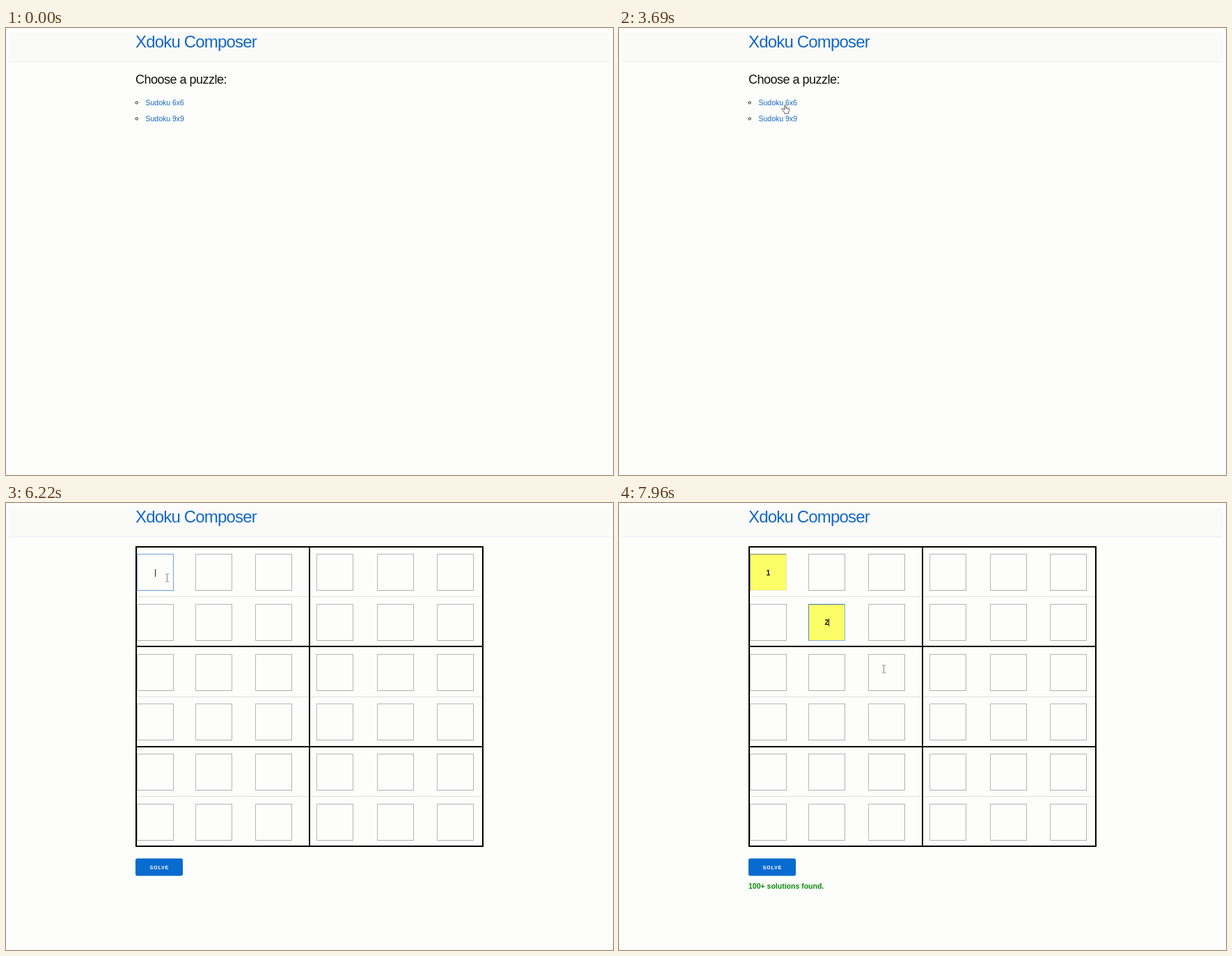
Recreate the animation shown at these times as an HTML page. Size 872x642 px, loop 8000 ms.

```html
<!DOCTYPE html>
<html lang="en">
<head>
<meta charset="utf-8">
<title>Xdoku Composer</title>
<style>
html, body { margin: 0; width: 100%; height: 100%; overflow: hidden; background: #fdfdfc; }
svg { display: block; width: 872px; height: 642px; font: 10.5px "Liberation Sans", Arial, sans-serif; }
.crisp { shape-rendering: crispEdges; }
.link { fill: #1267c5; }
.bold { font-weight: bold; }
.mid { text-anchor: middle; }
</style>
</head>
<body>
<svg viewBox="0 0 872 642">
  <rect width="872" height="642" fill="#fdfdfc"/>
  <g class="crisp">
    <rect x="4" y="7" width="863" height="41" fill="#fafaf9"/>
    <rect x="4" y="48" width="863" height="1" fill="#ebebf5"/>
  </g>
  <text class="link" x="186" y="28" font-size="24" letter-spacing="-.83">Xdoku Composer</text>

  <g id="menu">
    <text x="186" y="80" font-size="18" letter-spacing="-.5" fill="#111">Choose a puzzle:</text>
    <g fill="none" stroke="#222">
      <circle cx="187.7" cy="107.3" r="1.7"/>
      <circle cx="187.7" cy="130.3" r="1.7"/>
    </g>
    <text class="link" x="200.5" y="111">Sudoku 6x6</text>
    <text class="link" x="200.5" y="134">Sudoku 9x9</text>
  </g>

  <g id="board">
    <g id="grid" class="crisp"></g>
    <rect x="186" y="510.5" width="68" height="25" rx="2.7" fill="#086bcf"/>
    <text class="bold" x="206.5" y="526" font-size="7.3" letter-spacing=".67" fill="#fff">SOLVE</text>
    <text id="note" class="bold" x="186" y="554" fill="#0a8a0a">100+ solutions found.</text>
    <text id="one" class="bold mid" x="214.5" y="103.5" fill="#111">1</text>
    <text id="two" class="bold mid" x="298.5" y="175" fill="#111">2</text>
    <rect id="caret" class="crisp" width="1" height="11" fill="#222"/>
    <rect id="speck" class="crisp" x="294" y="175" width="2" height="2" fill="#777"/>
  </g>

  <g id="arrow">
    <path d="M0 0V10.2L2.4 8L4 11.6L5.7 10.9L4.1 7.4H7.2Z" fill="#000" stroke="#fff" stroke-width=".5"/>
  </g>
  <g id="hand">
    <path d="M-.9 7.2V1Q-.9 0 .1 0T1.1 1V4.2Q2 3.5 2.8 4.4Q3.8 3.8 4.5 4.8Q5.9 4.5 6 6V8.2L4.9 10.6V12.4H-.8V11L-3.3 8L-4.8 5.9Q-4.6 4.6 -3.2 5.2L-.9 7.2Z" fill="#fff" stroke="#444" stroke-width=".9" stroke-linejoin="round"/>
    <path d="M1.1 4.2V6M2.8 4.4V6.2M4.5 4.8V6.3" fill="none" stroke="#555" stroke-width=".7"/>
  </g>
  <g id="beam">
    <path d="M-2.5 -5.5H-.6L0 -5L.6 -5.5H2.5M0 -5V5M-2.5 5.5H-.6L0 5L.6 5.5H2.5" fill="none" stroke="#8b8676"/>
  </g>
</svg>
<script>
const LOOP = 8000;
const NS = "http://www.w3.org/2000/svg";
const $ = id => document.getElementById(id);
const grid = $("grid");

function rect(x, y, w, h, fill) {
  const r = document.createElementNS(NS, "rect");
  const attrs = { x, y, width: w, height: h, fill };
  for (const k in attrs) r.setAttribute(k, attrs[k]);
  grid.append(r);
  return r;
}

// An input box: a fill plus four edges that can be coloured one by one.
function cell(x, y) {
  const s = 53;
  return {
    face: rect(x, y, s, s, "none"),
    edges: [
      rect(x, y, s, 1), rect(x + s - 1, y, 1, s),
      rect(x, y + s - 1, s, 1), rect(x, y, 1, s)
    ]
  };
}

const LOOKS = {
  plain: ["none", "#b5b5b9", "#b2b2b6", "#b0b0b4", "#b8b8bc"],
  focus: ["none", "#6f9fd8", "#6f9fd8", "#6f9fd8", "#6f9fd8"],
  full: ["#fdfd68", "#83836c", "#e6e6b0", "#ebebb8", "#93937c"],
  both: ["#fdfd68", "#4078b4", "#8db2d8", "#8db2d8", "#5586bc"]
};

function paint(c, look) {
  const [face, ...edges] = LOOKS[look];
  c.face.setAttribute("fill", face);
  c.edges.forEach((e, i) => e.setAttribute("fill", edges[i]));
}

for (const y of [134, 278, 421]) rect(188, y, 496, 1, "#dedee0");
const cols = [188, 272, 358, 446, 533, 619];
const rows = [73, 145, 217, 288, 360, 432];
const cells = rows.map(y => cols.map(x => cell(x, y)));
cells.flat().forEach(c => paint(c, "plain"));
for (const y of [62, 205, 349, 492]) rect(186, y, 500, 2, "#000");
for (const x of [186, 435, 684]) rect(x, 62, 2, 432, "#000");

const T = {
  show: 2790, link: 3690, page: 3990, beam: 4420,
  focus1: 6060, type1: 6520, note: 6640,
  focus2: 7300, type2: 7560
};

// time, x, y of the pointer
const path = [
  [2790, 714, 265], [3150, 530, 190], [3510, 340, 126],
  [3600, 276, 116], [3690, 238.5, 110.5], [4420, 237.5, 110.5],
  [5260, 237.5, 110.5], [5800, 231.5, 107.5],
  [6700, 231.5, 107.5], [7000, 262, 138], [7290, 304, 176.5],
  [7580, 304, 176.5], [7670, 342, 205], [7960, 380.5, 238.5]
];

function pointer(t) {
  if (t < T.page) t = T.show + Math.floor((t - T.show) / 90) * 90;
  let i = path.findIndex(p => p[0] > t);
  if (i < 0) return path[path.length - 1].slice(1);
  if (i === 0) return path[0].slice(1);
  const [a, ax, ay] = path[i - 1], [b, bx, by] = path[i];
  const k = (t - a) / (b - a);
  return [ax + (bx - ax) * k, ay + (by - ay) * k];
}

const show = (id, on) => $(id).style.display = on ? "" : "none";

function draw(t) {
  const onPage = t >= T.page;
  show("menu", !onPage);
  show("board", onPage);
  show("one", t >= T.type1);
  show("two", t >= T.type2);
  show("note", t >= T.note);
  show("speck", t >= T.focus2 && t < T.type2);

  const second = t >= T.focus2;
  paint(cells[0][0], t < T.focus1 ? "plain" : t < T.type1 ? "focus" : second ? "full" : "both");
  paint(cells[1][1], !second ? "plain" : t < T.type2 ? "focus" : "both");

  const typed = t >= (second ? T.type2 : T.type1);
  const since = t - (second ? (typed ? T.type2 : T.focus2) : (typed ? T.type1 : T.focus1));
  show("caret", t >= T.focus1 && since % 1000 < 500);
  $("caret").setAttribute("x", (second ? 298 : 214) + (typed ? 3 : 0));
  $("caret").setAttribute("y", second ? 166 : 95);

  const shape = t < T.show ? "" : t < T.link ? "arrow" : t < T.beam ? "hand" : "beam";
  const [x, y] = pointer(t);
  for (const id of ["arrow", "hand", "beam"]) {
    show(id, id === shape);
    if (id === shape) $(id).setAttribute("transform", `translate(${x} ${y})`);
  }
}

const start = performance.now();
function tick() {
  draw((performance.now() - start) % LOOP);
  requestAnimationFrame(tick);
}
tick();
</script>
</body>
</html>
```
